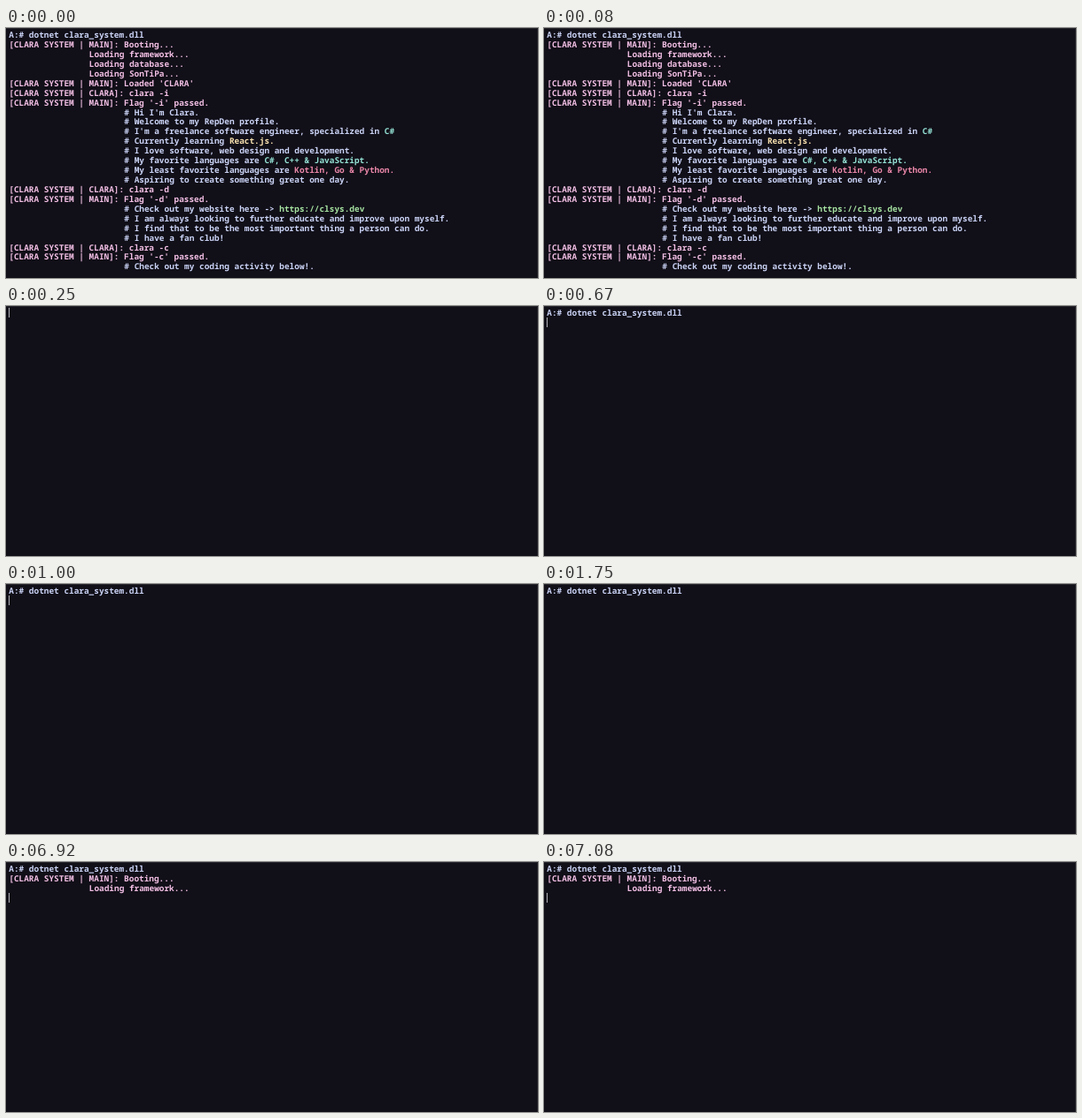
Animation of 600 by 283 pixels, one loop 8000 ms. Source, as an HTML page:

```html
<!DOCTYPE html>
<html lang="en">
<head>
<meta charset="utf-8">
<title>Terminal</title>
<style>
  html, body { margin: 0; width: 100%; height: 100%; overflow: hidden; background: #110f18; }
  svg { display: block; width: 600px; height: 283px; }
  text {
    font: 600 9.425px "Noto Sans Mono", "DejaVu Sans Mono", monospace;
    text-rendering: geometricPrecision;
    font-variant-ligatures: none;
    white-space: pre;
  }
</style>
</head>
<body>
<svg viewBox="0 0 600 283">
  <rect width="600" height="283" fill="#110f18"/>
  <path d="M0 .5H599.5V283" fill="none" stroke="#28272d"/>
  <g id="screen"></g>
  <rect id="cursor" x="3" width="1" height="11" fill="#b4b4bc"/>
</svg>
<script>
const LOOP = 8000, LEFT = 3.3, CELL = 5.655, TOP = 2, PITCH = 10.93, BASE = 11.1;
const WHITE = '#cad3f5', PINK = '#f2bfe4', TEAL = '#94e2d5',
      YELLOW = '#f9e2af', RED = '#ea87a8', GREEN = '#a6e3a1';

// A row is a start column followed by [text, colour] runs.
const main = text => [0, ['[CLARA SYSTEM | MAIN]: ' + text, PINK]];
const user = text => [0, ['[CLARA SYSTEM | CLARA]: ' + text, PINK]];
const load = text => [16, ['Loading ' + text + '...', PINK]];
const note = (text, ...runs) => [23, ['# ' + text, WHITE], ...runs];

const rows = [
  [0, ['A:# dotnet clara_system.dll', WHITE]],
  main('Booting...'),
  load('framework'),
  load('database'),
  load('SonTiPa'),
  main("Loaded 'CLARA'"),
  user('clara -i'),
  main("Flag '-i' passed."),
  note("Hi I'm Clara."),
  note('Welcome to my RepDen profile.'),
  note("I'm a freelance software engineer, specialized in ", ['C#', TEAL]),
  note('Currently learning ', ['React.js.', YELLOW]),
  note('I love software, web design and development.'),
  note('My favorite languages are ', ['C#, C++ & JavaScript.', TEAL]),
  note('My least favorite languages are ', ['Kotlin, Go & Python.', RED]),
  note('Aspiring to create something great one day.'),
  user('clara -d'),
  main("Flag '-d' passed."),
  note('Check out my website here -> ', ['https://clsys.dev', GREEN]),
  note('I am always looking to further educate and improve upon myself.'),
  note('I find that to be the most important thing a person can do.'),
  note('I have a fan club!'),
  user('clara -c'),
  main("Flag '-c' passed."),
  note('Check out my coding activity below!.')
];

// [start in ms, rows shown, cursor visible]
const states = [
  [0, rows.length, false],
  [250, 0, true],
  [670, 1, true],
  [1750, 1, false],
  [5750, 2, true],
  [6920, 3, true]
];

const screen = document.getElementById('screen');
const cursor = document.getElementById('cursor');

function add(parent, tag, attrs) {
  const node = document.createElementNS('http://www.w3.org/2000/svg', tag);
  for (const key in attrs) node.setAttribute(key, attrs[key]);
  return parent.appendChild(node);
}

const lines = rows.map(([col, ...runs], i) => {
  const line = add(screen, 'text', { x: LEFT + col * CELL, y: BASE + i * PITCH });
  for (const [text, fill] of runs) add(line, 'tspan', { fill }).textContent = text;
  return line;
});

function draw(now) {
  const t = now % LOOP;
  const [, count, blink] = states.filter(s => s[0] <= t).pop();
  lines.forEach((line, i) => line.setAttribute('visibility', i < count ? 'visible' : 'hidden'));
  cursor.setAttribute('visibility', blink ? 'visible' : 'hidden');
  cursor.setAttribute('y', Math.round(TOP + count * PITCH));
}

const start = performance.now();
function tick() {
  draw(performance.now() - start);
  requestAnimationFrame(tick);
}
tick();
</script>
</body>
</html>
```
